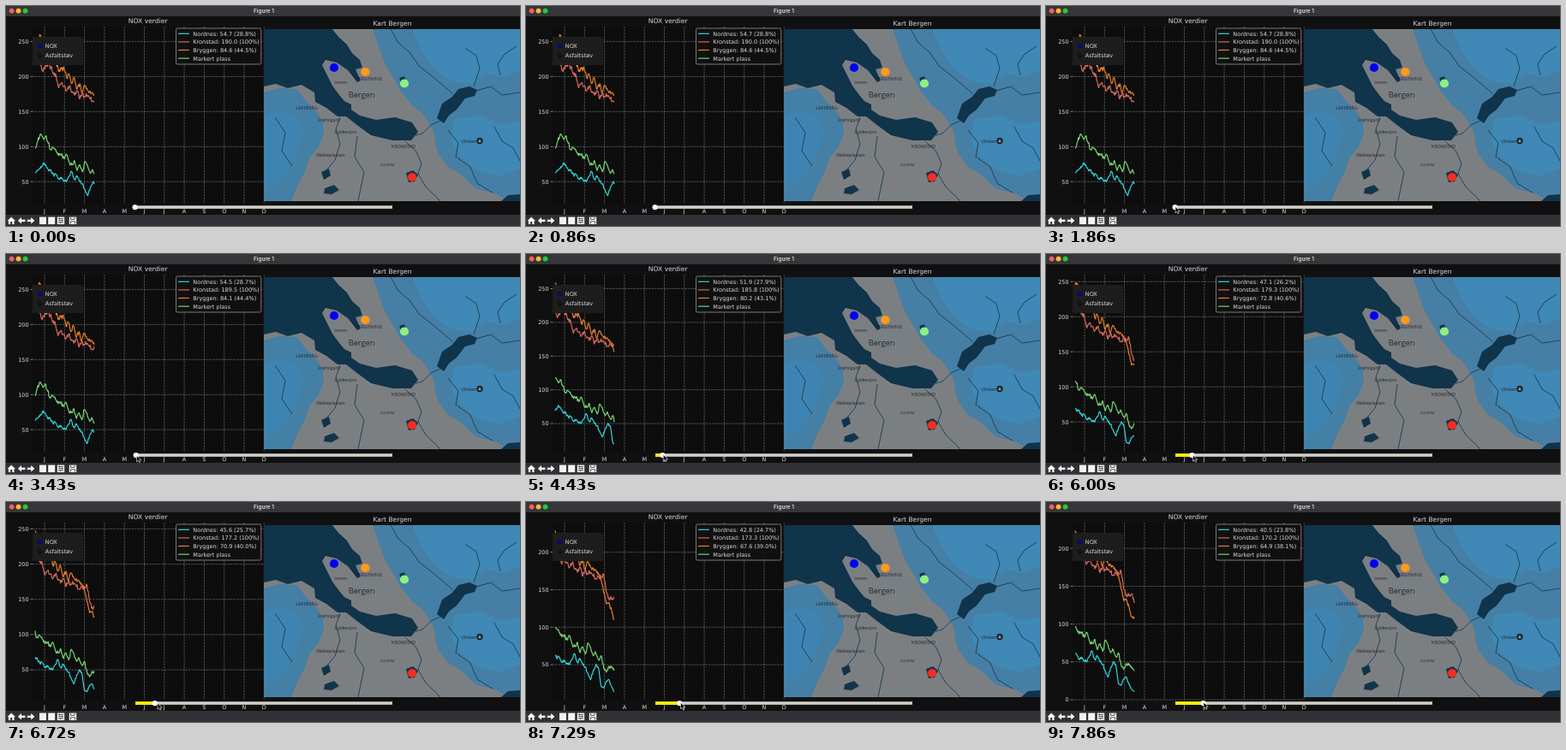
Write an HTML page that moves like this. It is 600 px wide and 257 px high and loops after 8 s.

```html
<!DOCTYPE html>
<html lang="no">
<head>
<meta charset="utf-8">
<title>Figure 1</title>
<style>
html, body { margin: 0; width: 100%; height: 100%; overflow: hidden; background: #101010; }
svg { display: block; width: 100vw; height: 100vh; }
text { font-family: "DejaVu Sans", sans-serif; font-size: 6.5px; fill: #dcdcdc; }
.title { font-size: 7.6px; text-anchor: middle; }
.mid { text-anchor: middle; }
.end { text-anchor: end; }
.map text { font-family: "Open Sans", sans-serif; font-size: 5px; fill: #1d252a; text-anchor: middle; }
.grid line { stroke: #808080; stroke-width: .6; stroke-dasharray: 2.4 1.1; }
.tick { stroke: #ccc; stroke-width: .6; }
.line { fill: none; stroke-width: 1.15; stroke-linejoin: round; }
</style>
</head>
<body>
<svg id="stage" viewBox="0 0 600 257" preserveAspectRatio="none">
  <rect width="600" height="257" fill="#101010"/>
  <rect x="31" y="24" width="270" height="207" fill="#0d0d0d"/>
  <g class="grid" id="months"></g>
  <g class="grid" id="levels"></g>
  <g id="lines"></g>
  <text class="title" x="165.7" y="19.6">NOX verdier</text>

  <rect x="31" y="36" width="59" height="33" fill="#1d1d1d"/>
  <circle cx="39.5" cy="46.7" r="2" fill="#00f" stroke="#000" stroke-width=".6"/>
  <circle cx="39.5" cy="58" r="2" fill="#1d1d1d" stroke="#000" stroke-width=".8"/>
  <text x="45.8" y="49">NOX</text>
  <text x="45.8" y="60.3">Asfaltstøv</text>

  <rect x="198.5" y="26" width="99.3" height="42" rx="1.6" fill="#111" fill-opacity=".9" stroke="#aaa" stroke-width=".7"/>
  <g id="legend"></g>

  <svg class="map" x="301" y="27" width="299" height="201" viewBox="301 27 299 201">
    <rect x="301" y="27" width="299" height="201" fill="#7c7f82"/>
    <path fill="#447fa6" d="M301 101 318 96 340 97 349 110 360 120 370 136 371 150 364 166 354 178 349 194 341 208 333 228H301Z"/>
    <path fill="#3c86b6" d="M301 130 316 122 336 127 347 141 344 164 333 183 320 205 301 212Z" opacity=".75"/>
    <path fill="#457fa5" d="M428 27H600V228H588L570 219 548 213 530 196 515 187 503 169 499 146 487 126 474 116 461 100 453 85 443 69 436 50Z"/>
    <path fill="#3f8cbd" d="M474 27H600V75L578 84 560 78 543 91 520 88 501 74 487 57Z" opacity=".7"/>
    <path fill="#3f8cbd" d="M522 133 553 127 578 139 600 134V190L575 199 550 192 531 177 519 157Z" opacity=".7"/>
    <g fill="#10344a">
      <path d="M301 27H381L388 36 398 45 404 55 413 63 416 72 408 74 414 87 410 89 399 75 386 66 373 63 369 69 375 81 381 93 389 104 395 111 403 115 403 121 413 128 432 133 454 130 474 136 481 147 473 157 451 157 426 151 411 140 397 129 387 129 374 119 361 112 360 101 345 92 329 96 315 91 301 94Z"/>
      <path d="M503 131 509 114 521 106 528 97 541 94 550 98 547 105 536 108 526 121 517 128 511 137Z"/>
      <path d="M467 195 475 192 481 197 477 205 470 206Z"/>
      <path d="M368 194 377 190 379 198 371 203Z"/>
      <path d="M372 213 383 209 389 215 380 220 371 219Z"/>
      <path d="M459 84 465 82 467 87 462 91Z"/>
      <path d="M578 228 586 221 600 220V228Z"/>
    </g>
    <g fill="none" stroke="#193e54" stroke-width=".9">
      <path d="M449 27 458 43 471 54 482 70 501 85 522 103"/>
      <path d="M507 134 496 139 486 149 478 151"/>
      <path d="M549 99 566 94 579 104 600 101"/>
      <path d="M536 49 549 58 553 73 546 94"/>
      <path d="M596 47 582 56 574 68 577 81"/>
      <path d="M466 158 479 170 485 184 481 196 490 211 507 228"/>
      <path d="M516 145 528 160 525 176 542 188 550 207 568 218"/>
      <path d="M390 130 385 144 390 161 384 180 373 193"/>
      <path d="M314 130 326 148 322 169 334 187"/>
      <path d="M410 152 407 176 418 194 411 228"/>
      <path d="M570 141 579 158 592 166 600 181"/>
    </g>
    <path d="M414 91 421 95 434 94M417 97 426 107 438 108M436 83 447 99 442 117" fill="none" stroke="#4f8fb3" stroke-width="1" stroke-dasharray="2 1.5"/>
    <g id="places"></g>
    <circle cx="553" cy="157.5" r="3.7" fill="#1b2328"/>
    <path d="M551 159 553 155.6 555 159Z" fill="#9aa4aa"/>
    <circle cx="383" cy="72" r="5.1" fill="#0000fa"/>
    <circle cx="419.5" cy="77" r="5.1" fill="#ff9a1c"/>
    <circle cx="465" cy="90.5" r="5.1" fill="#90ee80"/>
    <circle cx="474" cy="200" r="5.1" fill="#ff2a20"/>
  </svg>
  <text class="title" x="451" y="22.7">Kart Bergen</text>

  <rect x="151" y="233.2" width="300" height="3.6" fill="#d0d0c8"/>
  <rect id="fill" x="151" y="233.2" height="3.6" fill="#f5f000"/>
  <circle id="knob" cy="235" r="3.1" fill="#fff"/>

  <rect width="600" height="12" fill="#36373a"/>
  <circle cx="6.6" cy="5.6" r="2.9" fill="#ff5f57"/>
  <circle cx="14.6" cy="5.6" r="2.9" fill="#febc2e"/>
  <circle cx="22.6" cy="5.6" r="2.9" fill="#28c840"/>
  <text x="301" y="8" class="mid" style="font:600 6.4px Inter, sans-serif">Figure 1</text>

  <rect y="244" width="600" height="13" fill="#303134"/>
  <g fill="#f4f4f4">
    <path d="M1.5 251 6.2 246.4 11 251H9.6V255H7.3V252H5.2V255H2.9V251Z"/>
    <path id="arrow" d="M13.8 250.7 18 246.8V249.5H22.4V251.9H18V254.6Z"/>
    <use href="#arrow" transform="translate(47.2 0) scale(-1 1)"/>
    <path d="M39 246.5h8v8.4h-8zM49.2 246.5h8v8.4h-8zM59.8 246.5h8.4v8.4h-8.4zM73.8 246.5h8.4v8.4h-8.4z"/>
  </g>
  <path d="M61 248.5h6M61 250.7h6M61 252.9h6M62.5 247.5v2M65.5 249.7v2M63.5 251.9v2M75.5 246.7v2.6h4.5v-2.6M75.5 254.7v-3h5v3" fill="none" stroke="#303134" stroke-width=".8"/>
  <path id="cursor" d="M0 0V7.2L1.7 5.7 2.9 8.2 4.1 7.6 3 5.2H5.3Z" fill="#000" stroke="#fff" stroke-width=".6"/>
</svg>
<script>
const LOOP = 8000, STEPS = 56, SPAN = 90;
const AXES = { left: 34, day: 69 / SPAN, top: 24, bottom: 231 };
const NS = 'http://www.w3.org/2000/svg';
const $ = id => document.getElementById(id);

function add(parent, tag, attrs, content = '') {
  const el = document.createElementNS(NS, tag);
  for (const key in attrs) el.setAttribute(key, attrs[key]);
  el.textContent = content;
  parent.append(el);
  return el;
}

// Piecewise linear lookup; rows are [position, value, value, ...]
function lookup(rows, x, col = 1) {
  if (x <= rows[0][0]) return rows[0][col];
  for (let i = 1; i < rows.length; i++) {
    const a = rows[i - 1], b = rows[i];
    if (x <= b[0]) return a[col] + (b[col] - a[col]) * (x - a[0]) / (b[0] - a[0]);
  }
  return rows[rows.length - 1][col];
}

const noise = n => {
  const s = Math.sin(n * 127.1) * 43758.5453;
  return (s - Math.floor(s)) * 2 - 1;
};

// One value every fourth day, with daily jitter in between
function series(points, seed) {
  return Array.from({ length: 121 }, (_, d) => {
    const i = Math.floor(d / 4), f = d % 4 / 4;
    const v = points[i] + f * ((points[i + 1] ?? 0) - points[i]);
    return f ? v + noise(d + seed) * Math.sqrt(v) * .3 : v;
  });
}

const SERIES = [
  { name: 'Nordnes', color: '#2fdfe3', data: series([63, 66, 69, 75, 74, 66, 67, 60, 60, 53, 56, 52, 50, 58, 64, 53,
    58, 50, 47, 38, 30, 42, 50, 46, 21, 19, 28, 30, 21, 14, 10.6], 11) },
  { name: 'Kronstad', color: '#dd6a5f', data: series([228, 236, 216, 207, 218, 219, 213, 203, 200, 184, 191, 186, 180, 186, 177, 173,
    180, 168, 176, 171, 173, 168, 165, 168, 166, 170, 146, 139, 137, 140, 128], 223) },
  { name: 'Bryggen', color: '#ea7f2c', data: series([245, 252, 259, 250, 241, 245.5, 240, 224, 221, 207, 211, 212, 198, 203, 191, 197,
    182, 190, 177, 187, 180, 179, 176, 172, 164, 146, 131, 133, 123, 110, 107], 431) },
  { name: 'Markert plass', color: '#79dd78', data: series([98, 108, 118, 113, 115, 105, 96, 98, 93, 87, 89, 83, 89, 77, 74, 80,
    66, 74, 64, 79, 73, 62, 66, 57, 62, 46, 40, 48, 46, 42, 38], 617) }
];

// day, then mean for Nordnes, Kronstad, Bryggen
const MEANS = [[0, 54.7, 190, 84.6], [1, 54.46, 189.5, 84.1], [8, 51.9, 185.8, 80.16],
  [18, 47.06, 179.3, 72.8], [21, 45.6, 177.2, 70.9], [30, 40.5, 170.2, 64.9]];
const DAYS = [[0, 0], [2570, 0], [3420, 1], [4420, 8], [6000, 18], [6710, 21], [7850, 30]];
const POINTER = [[850, 160, 258], [1430, 151, 235], [1860, 151, 234.5], [3430, 152.5, 235.5],
  [4430, 160.3, 234.5], [6000, 171.5, 235], [6720, 177, 235], [7850, 184, 234]];

[...'JFMAMJJASOND'].forEach((m, i) => {
  const x = 45 + i * 23.3;
  add($('months'), 'line', { x1: x, x2: x, y1: AXES.top, y2: AXES.bottom });
  add($('months'), 'text', { x, y: 241.7, class: 'mid' }, m);
});

const levels = [0, 50, 100, 150, 200, 250].map(value => {
  const g = add($('levels'), 'g', {});
  add(g, 'line', { x1: 31, x2: 301, y1: 0, y2: 0 });
  add(g, 'path', { d: 'M28.6 0H31', class: 'tick' });
  add(g, 'text', { x: 26.6, y: 2.4, class: 'end' }, value);
  return { value, g };
});

SERIES.forEach((s, i) => {
  const y = 32.3 + i * 9.6;
  s.path = add($('lines'), 'path', { class: 'line', stroke: s.color });
  add($('legend'), 'path', { class: 'line', stroke: s.color, d: `M201 ${y}H214` });
  s.label = add($('legend'), 'text', { x: 218.3, y: y + 2.4 }, s.name);
});

[['NORDNES', 391, 90.5, 3.2], ['BERGENHUS', 423.5, 87, 5.4], ['Bergen', 415, 107, 9.2], ['LAKSEVÅG', 351, 121, 5.4],
 ['Damsgard', 377, 135, 5.3], ['Gyldenpris', 396.5, 148.5, 5.2], ['KRONSTAD', 464, 166, 5.5],
 ['Melkeplassen', 379, 176, 5.3], ['SOLHEIM', 445, 187, 3.8], ['Ulriken', 540.5, 160, 5.5]
].forEach(([name, x, y, size]) => add($('places'), 'text', { x, y, style: `font-size:${size}px` }, name));

function draw(time) {
  const t = Math.floor(time % LOOP / LOOP * STEPS) * LOOP / STEPS;
  const day = Math.round(lookup(DAYS, t));
  const views = SERIES.map(s => s.data.slice(day, day + SPAN + 1));
  const all = views.flat();
  const min = Math.min(...all), max = Math.max(...all), pad = (max - min) * .05;
  const scale = (AXES.bottom - AXES.top) / (max - min + 2 * pad);
  const yOf = v => AXES.bottom - (v - min + pad) * scale;

  for (const { value, g } of levels) {
    const y = yOf(value);
    g.setAttribute('transform', `translate(0 ${y})`);
    g.setAttribute('display', y < AXES.top || y > AXES.bottom + .8 ? 'none' : 'inline');
  }

  const total = lookup(MEANS, day, 2);
  SERIES.forEach((s, i) => {
    s.path.setAttribute('d', 'M' + views[i].map((v, d) =>
      `${(AXES.left + d * AXES.day).toFixed(2)} ${yOf(v).toFixed(2)}`).join('L'));
    if (i === 3) return;
    const mean = lookup(MEANS, day, i + 1);
    const share = i === 1 ? '100' : (mean / total * 100).toFixed(1);
    s.label.textContent = `${s.name}: ${mean.toFixed(1)} (${share}%)`;
  });

  const knob = 150.6 + day * 1.1;
  $('knob').setAttribute('cx', knob);
  $('fill').setAttribute('width', Math.max(0, knob - 151));
  $('cursor').setAttribute('transform', `translate(${lookup(POINTER, t)} ${lookup(POINTER, t, 2)})`);
}

const start = performance.now();
function tick() {
  draw(performance.now() - start);
  requestAnimationFrame(tick);
}
tick();
</script>
</body>
</html>
```
